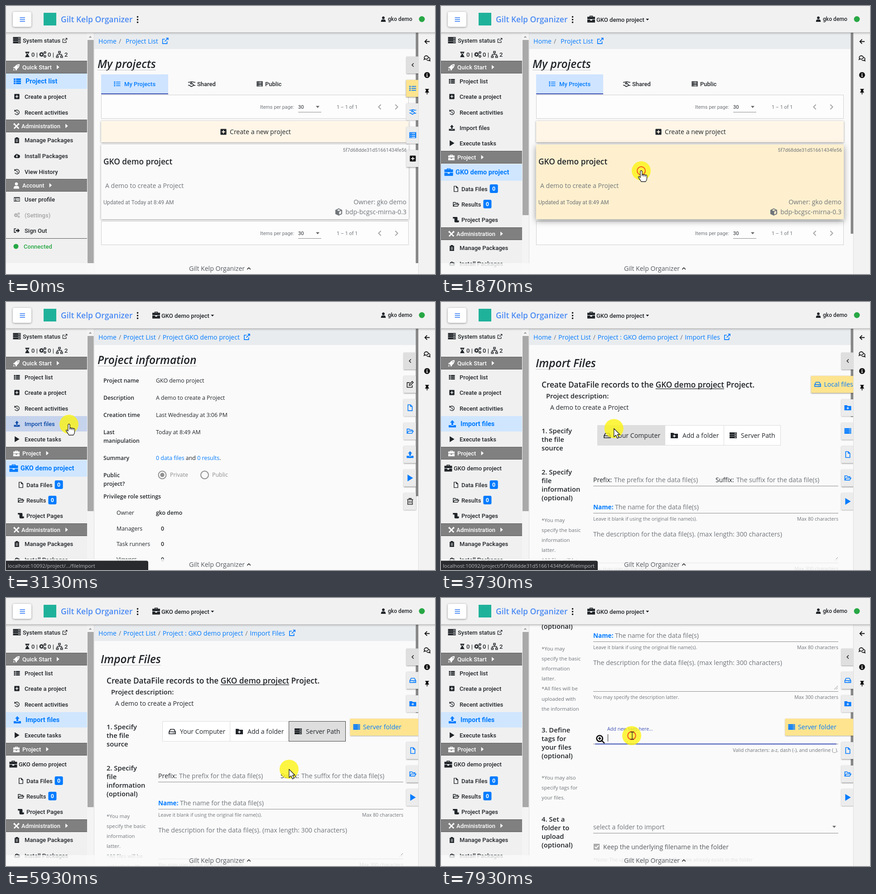
An HTML page with a canvas for the animation above (8000 ms loop, 947x592 px).

```html
<!DOCTYPE html>
<html lang="en">
<head>
<meta charset="utf-8">
<title>Project console</title>
<style>
html, body { margin: 0; width: 100%; height: 100%; overflow: hidden; background: #fafafa; }
canvas { display: block; width: 947px; height: 592px; }
</style>
</head>
<body>
<canvas id="stage"></canvas>
<script>
const W = 947, H = 592, LOOP = 8000;
const canvas = document.getElementById('stage');
const c = canvas.getContext('2d');
const dpr = window.devicePixelRatio || 1;
canvas.width = W * dpr;
canvas.height = H * dpr;

const APP = 'Gilt Kelp Organizer', PROJ = 'GKO demo project', USER = 'gko demo';
const ID = '5f7d68dde31d51661434fe56';
const BLUE = '#007bff', DARK = '#212529', GRAY = '#70757a', INDIGO = '#3f51b5';

const roboto = (n, w = 500) => `${w} ${n}px Roboto, sans-serif`;
const sans = (n, w = 400) => `${w} ${n}px "Open Sans", "Noto Sans", sans-serif`;
const BODY = sans(14.1), SMALL = sans(12.4), STRONG = sans(12.3, 600), STEP = sans(14.8, 600);
const HINT = sans(10.7), SIDE = roboto(13);

const clamp = v => Math.max(0, Math.min(1, v));
const smooth = u => u * u * (3 - 2 * u);
const ease = (t, a, b) => smooth(clamp((t - a) / (b - a)));

// Icons live in a 16 unit box.
const gear = (x, y, r) => {
  let d = '';
  for (let i = 0; i < 32; i++) {
    const a = (i + .5) / 32 * Math.PI * 2, k = i % 4 < 2 ? r : r * .74;
    d += (i ? 'L' : 'M') + (x + k * Math.cos(a)) + ' ' + (y + k * Math.sin(a));
  }
  const h = r * .36;
  return `${d}zM${x - h} ${y}a${h} ${h} 0 1 0 ${2 * h} 0a${h} ${h} 0 1 0 ${-2 * h} 0z`;
};
const rows = f => [2, 6.5, 11].map(f).join('');
const FILL = {
  server: rows(y => `M0 ${y - 1}h16v4H0zM11 ${y + .3}h1.5v1.4H11zM13.3 ${y + .3}h1.5v1.4h-1.5z`),
  hour: 'M2 0h12v2H2zM2 14h12v2H2zM3 2h10c0 4-3 4-3 6s3 2 3 6H3c0-4 3-4 3-6S3 6 3 2zM5 3.5h6L9 6H7z',
  cogs: gear(5.5, 8, 5.5) + gear(13, 3.8, 3.2) + gear(13, 12.2, 3.2),
  net: 'M5 0h6v5H5zM6.5 1.5v2h3v-2zM0 11h6v5H0zM1.5 12.5v2h3v-2zM10 11h6v5h-6zM11.5 12.5v2h3v-2zM7.3 5h1.4v2.3H14V11h-1.4V8.7H3.4V11H2V7.3h5.3z',
  rocket: 'M16 0C9 0 6 3 4 6L1 7l-1 3 4 .5L5.5 12 6 16l3-1 1-3c3-2 6-5 6-12zM12 2.8a1.3 1.3 0 1 1-.01 0zM1 12l3 3-4 1z',
  right: 'M4 1l8 7-8 7z',
  down: 'M1 4h14l-7 8z',
  list: rows(y => `M0 ${y}h4v3.4H0zM5.2 ${y}H16v3.4H5.2z`),
  bullets: rows(y => `M0 ${y}h3v3H0zM5 ${y + .6}h11v1.8H5z`),
  plus: 'M2.5 1h11Q15 1 15 2.5v11q0 1.5-1.5 1.5h-11Q1 15 1 13.5v-11Q1 1 2.5 1zM7 4v3H4v2h3v3h2V9h3V7H9V4z',
  upload: 'M8 0l5 5.5h-3V11H6V5.5H3zM0 11h5v1.2h6V11h5v5H0z',
  play: 'M2 0l13 8-13 8z',
  bag: 'M4.5 3V1h7v2H16v5H0V3zM6 2.3V3h4v-.7zM0 9h6v2h4V9h6v6H0z',
  scroll: 'M0 1h10q2 0 2 2v7h4v2q0 3-2.5 3H7q-3 0-3-3V5H0z',
  clip: 'M2 2h3V0h6v2h3v14H2zM5 5.5h6v1.2H5zM5 8.5h6v1.2H5zM5 11.5h6v1.2H5z',
  cloud: 'M4 14a4 4 0 0 1-1-7.8A5 5 0 0 1 12 5a4.5 4.5 0 0 1 0 9zM7 5v4H5l3 3.5L11 9H9V5z',
  user: 'M8 0a4 4 0 1 1-.01 0zM1 16c0-5 2-7 4-7h6c2 0 4 2 4 7z',
  card: 'M0 2h16v12H0zM1.3 4.5v8.2h13.4V4.5zM5 5.5a1.7 1.7 0 1 1-.01 0zM2.5 12c0-3 5-3 5 0zM9 6h4v1.2H9zM9 9h4v1.2H9z',
  out: 'M0 2h6v2H2v8h4v2H0zM10 2l6 6-6 6v-4H5V6h5z',
  table: 'M0 1h16v14H0z' + rows(y => `M2.5 ${y + .8}h2v2h-2zM6 ${y + .8}h7.5v2H6z`),
  folderPlus: 'M0 2h6l2 2h8v10H0zM7.2 6v2.2H5v1.6h2.2V12h1.6V9.8H11V8.2H8.8V6z',
  cube: 'M8 0l7.5 3.5v9L8 16 .5 12.5v-9zM8 2L4 4l4 1.8L12 4zM9 7.5v6l4.5-2.3V5.5z',
  info: 'M8 0a8 8 0 1 1-.01 0zM6.8 3v2.2h2.4V3zM6 6.5V8h1v3.5H6V13h4v-1.5H9v-5z',
  pin: 'M3 0h10v2h-2l.5 5q2 1 2 3H9v4l-1 2-1-2v-4H2.5q0-2 2-3L5 2H3z'
};
const LINE = {
  ext: 'M10 1.5h4.5V6M14.5 1.5L6.5 9.5M12 9v5.5H1.5V4H7',
  clock: 'M3 4A6.3 6.3 0 1 1 2.6 11M2 1v4h4M8.3 5v4l2.5 1.5',
  file: 'M3 1h6l4 4v10H3zM9 1v4h4',
  folder: 'M1 13V3h5l2 2h5v3M1 13l3-5h11.5l-3 5z',
  tools: 'M2 2l12 12M14 2L2 14M1 4l3-3M12 1l3 3',
  shake: 'M0 4.5h3l3-1h4l3 1h3M0 11h2.5l4.5 3 5-2.5h4M8.5 3.5L5 7.5q2 2 4-.5l4 4.5',
  up: 'M2 11l6-6 6 6', prev: 'M11 2L5 8l6 6', next: 'M5 2l6 6-6 6',
  edit: 'M13 10v5H1V4h6M6 10.5l.5-3L13 1l2.5 2.5L9 10z',
  trash: 'M1 3.5h14M5.5 3.5V1h5v2.5M2.5 3.5V15h11V3.5M6 6.5v6M10 6.5v6',
  disk: 'M1 8.5L4 3h8l3 5.5V13H1zM1 8.5h14M9.5 11h1M12 11h1',
  zoom: 'M11 11l4.5 4.5M6.5 1a5.5 5.5 0 1 1-.01 0zM6.5 4v5M4 6.5h5',
  back: 'M15 8H2M8 2L2 8l6 6',
  chat: 'M6 2a5 4 0 1 1-2.5 7.5L1 11l1-3A5 4 0 0 1 6 2zM12 6a4 3.5 0 0 1 2 5.5l1 2.5-3-1a5 4 0 0 1-5-1'
};
const HEAVY = { tools: 3, zoom: 2.2, back: 2.2, prev: 2.2, next: 2.2, up: 2.6 };
const HAND = 'M-2 1Q0-2 2 1V9q2-2 3.5 0q2-1.5 3.5.5q3-1 3.5 1.5V17q0 4-3 7H0Q-3 19-6 15q-1-3 2-2l2 2z';
const ARROW = 'M0 0V18.5L4.5 14.5l3 7 3.2-1.4-3-6.8H13z';
const BEAM = 'M-3-8h2.5q1.5 0 1.5 1.5V6.5Q1 8-.5 8H-3M5-8H2.5Q1-8 1-6.5M5 8H2.5Q1 8 1 6.5';
const cache = {};
const shape = d => cache[d] || (cache[d] = new Path2D(d));

function icon(name, x, y, size, color) {
  c.save();
  c.translate(x - size / 2, y - size / 2);
  c.scale(size / 16, size / 16);
  c.fillStyle = c.strokeStyle = color;
  if (FILL[name]) c.fill(shape(FILL[name]), 'evenodd');
  else {
    c.lineWidth = HEAVY[name] || 1.7;
    c.stroke(shape(LINE[name]));
  }
  c.restore();
}

// y is the middle of the capitals; returns the x after the text.
function text(s, x, y, font, color = DARK, align = 'left') {
  c.font = font;
  c.fillStyle = color;
  c.textAlign = align;
  c.fillText(s, x, y + parseFloat(font.match(/[\d.]+px/)[0]) * .357);
  return x + c.measureText(s).width;
}
const lines = (list, x, y, step, font, color) => list.forEach((s, i) => text(s, x, y + i * step, font, color));

function box(x, y, w, h, fill, border) {
  c.fillStyle = fill;
  c.fillRect(x, y, w, h);
  if (border) {
    c.strokeStyle = border;
    c.lineWidth = 1;
    c.strokeRect(x + .5, y + .5, w - 1, h - 1);
  }
}
function raised(x, y, w, h, fill, blur, dy = 1, r = 0) {
  c.save();
  c.shadowColor = 'rgba(0,0,0,.4)';
  c.shadowBlur = blur * dpr;
  c.shadowOffsetY = dy * dpr;
  c.fillStyle = fill;
  c.beginPath();
  c.roundRect(x, y, w, h, r);
  c.fill();
  c.restore();
}
function disc(x, y, r, fill, line) {
  c.beginPath();
  c.arc(x, y, r, 0, 7);
  if (fill) { c.fillStyle = fill; c.fill(); }
  if (line) { c.strokeStyle = line; c.lineWidth = 2; c.stroke(); }
}

function section(name, label, y) {
  box(0, y - 14, 179, 28, '#808080');
  box(0, y - 14, 179, 1, '#5a5a5a');
  box(0, y + 13, 179, 1, '#5a5a5a');
  icon(name, 23, y + .5, 14, '#fff');
  const end = text(label, name === 'tools' ? 34 : 36, y + .5, SIDE, '#fff');
  icon('right', end + 14, y, 11, '#fff');
}
function item(name, label, y, state, big) {
  if (state === 'on') {
    box(0, y - (big ? 18 : 17), 179, big ? 37 : 34, '#d0e6ff');
    icon(name, big ? 17 : 25, y, big ? 19 : 16, BLUE);
    text(label, big ? 32 : 43, y, roboto(14.5, 700), BLUE);
    return;
  }
  if (state === 'hover') box(0, y - 17, 179, 34, '#c6d3ec');
  const color = state === 'hover' ? '#0a4aa8' : state === 'off' ? '#a3a3a3' : DARK;
  icon(name, big ? 16 : 24, y, big ? 17 : 13, color);
  text(label, big ? 28 : 41, y, SIDE, color);
}
function sub(name, label, x, y, count) {
  icon(name, x, y, 13.5, DARK);
  const end = text(label, 45, y, SIDE);
  if (!count) return;
  c.fillStyle = BLUE;
  c.beginPath();
  c.roundRect(end + 5, y - 10, 18, 19, 3);
  c.fill();
  text('0', end + 14, y, roboto(12.5, 700), '#fff', 'center');
}

function sidebar(t) {
  const open = t >= 1730, onImport = t >= 3450;
  box(0, 59, 194, 533, '#f0f0f0');
  icon('server', 24, 76, 17, DARK);
  text('System status', 37, 76, SIDE);
  icon('ext', 130, 76, 11.5, DARK);
  icon('hour', 47, 107, 12, DARK);
  text('0 |', 56, 107, SIDE);
  icon('cogs', 81, 107, 16, DARK);
  text('0 |', 92, 107, SIDE);
  icon('net', 118, 107, 15, DARK);
  text('2', 129, 107, SIDE);
  section('rocket', 'Quick Start', 135);
  item('list', 'Project list', 166, open ? '' : 'on');
  item('plus', 'Create a project', 200);
  item('clock', 'Recent activities', 235);
  let y = 265;
  if (open) {
    item('upload', 'Import files', 269, onImport ? 'on' : t >= 2950 ? 'hover' : '');
    item('play', 'Execute tasks', 303);
    section('bag', 'Project', 334);
    item('bag', PROJ, 367, onImport ? '' : 'on', true);
    sub('file', 'Data Files', 33, 404, true);
    sub('folder', 'Results', 33, 438, true);
    sub('scroll', 'Project Pages', 33, 472);
    y = 503;
  }
  section('tools', 'Administration', y);
  item('clip', 'Manage Packages', y + 31.5);
  item('cloud', 'Install Packages', y + 66);
  if (!open) {
    item('clock', 'View History', 366);
    section('user', 'Account', 396);
    item('card', 'User profile', 427);
    item('cogs', '(Settings)', 462, 'off');
    item('out', 'Sign Out', 496);
    box(0, 513, 179, 1, '#555');
    disc(22, 531, 5.5, '#28a745');
    text('Connected', 39, 531, SIDE, '#28a745');
  }
  box(179, 59, 15, 533, '#f4f4f4');
  box(180, 75, 13.5, (open ? 462 : 568) - 75, '#a9a9a9');
  c.fillStyle = '#a3a3a3';
  c.fill(shape('M182.5 70h7l-3.5-4z'));
  box(194, 59, 1, 533, '#dcdcdc');
}

function header(t) {
  raised(-9, -9, W + 18, 67, '#f1f1f1', 5, 1);
  raised(15, 13, 41, 33, '#fff', 4, 1, 4);
  for (let i = 0; i < 3; i++) box(30.5, 25 + i * 4, 11.5, 1.7, '#4285f4');
  box(83, 15, 28, 28, '#1fb29a');
  text(APP, 121, 30, sans(17.5, 600), '#4a8af4');
  for (let i = 0; i < 3; i++) disc(290.5, 24 + i * 6, 1.8, '#111');
  if (t >= 1730) {
    icon('bag', 331.5, 29, 17, DARK);
    icon('down', text(PROJ, 343, 30, SIDE) + 7, 30, 8, DARK);
  }
  icon('user', 833, 29, 12, DARK);
  text(USER, 843, 29, roboto(12.1));
  disc(918, 29, 6.5, '#28a745');
}

function rail() {
  box(910, 59, 37, 533, '#f2f2f2');
  box(910, 59, 1, 533, '#dcdcdc');
  ['back', 'chat', 'info', 'pin'].forEach((n, i) => icon(n, 929.5, 78.5 + i * 37, i === 1 ? 15 : 13, '#111'));
}

function crumbs(parts, gap) {
  box(195, 59, 710, 36, '#e9ecef');
  let x = 204;
  parts.forEach((p, i) => {
    if (i) {
      text('/', x + 5, 78, BODY, GRAY);
      x += gap;
    }
    x = text(p, x, 78, BODY, BLUE);
  });
  icon('ext', x + 16, 77, 15, BLUE);
}
function heading(s, x, y) {
  const end = text(s, x, y, 'italic ' + sans(24.6, 600));
  box(x, y + 13, end - x, 1, '#c4c4c4');
}

// Each tab: icon, colour, label, openness 0..1
function tabs(list, right) {
  list.forEach(([name, color, label, k = 0], i) => {
    const x = right - 26.5 - k * 124, y = 111.5 + i * 51.7;
    raised(x, y, right - x + 1, 37.5, label && k > 0 ? '#ffe48f' : i ? '#ececec' : '#dfdfdf', 2.5);
    icon(name, x + 14.5, y + 18.7, i ? 15 : 10, color);
    if (k > 0 && label) {
      c.save();
      c.beginPath();
      c.rect(x, y, right - x, 38);
      c.clip();
      text(label, x + 28.5, y + 18.7, BODY, BLUE);
      c.restore();
    }
  });
}
const thumb = (y, h) => box(904.5, y, 5.5, h, '#868686');

function paginator(y) {
  box(210, y, 679, 53, '#fdfdfd', '#d0d0d0');
  text('Items per page:', 561, y + 27, roboto(10.9, 400), GRAY);
  text('30', 645, y + 27, roboto(11, 400));
  icon('down', 688, y + 27, 9, '#666');
  box(645, y + 38, 51, 1, '#8a8a8a');
  text('1 – 1 of 1', 730, y + 27, roboto(10.9, 400), GRAY);
  icon('prev', 825, y + 27, 14, '#a5a5a5');
  icon('next', 862, y + 27, 14, '#a5a5a5');
}

function projectList(t) {
  crumbs(['Home', 'Project List'], 20);
  heading('My projects', 202, 128);
  box(210, 151, 148, 44, '#cfe4ff');
  box(210, 193, 148, 2, INDIGO);
  icon('bullets', 245.5, 172, 14, BLUE);
  text('My Projects', 261, 172, SIDE, BLUE);
  icon('shake', 410, 172, 16, DARK);
  text('Shared', 422, 172, SIDE);
  icon('table', 560, 172, 13, DARK);
  text('Public', 572, 172, SIDE);
  paginator(196);
  paginator(475);
  raised(210, 254, 679, 47, '#fff6e8', 4);
  icon('plus', 480, 278, 15, DARK);
  text('Create a new project', 494, 278, BODY);
  const k = ease(t, 780, 960);
  raised(210, 306, 679, 165, `rgb(${250 + 4 * k},${250 - 10 * k},${250 - 44 * k})`, 4 + 9 * k, 1 + 3 * k);
  text(ID, 885, 318, roboto(10.9, 400), GRAY, 'right');
  text(PROJ, 215, 344, sans(17.3, 600));
  text('A demo to create a Project', 219, 397, BODY, GRAY);
  text('Updated at Today at 8:49 AM', 215, 434, roboto(12.1, 400), GRAY);
  text('Owner: ' + USER, 884, 433, BODY, GRAY, 'right');
  text('bdp-bcgsc-mirna-0.3', 884, 455, BODY, GRAY, 'right');
  icon('cube', 734.5, 455, 16, GRAY);
  thumb(59, t < 600 ? 509 : 444);
  if (t < 1730) tabs([['prev', '#111'], ['bullets', BLUE, ' ', .001], ['shake', BLUE], ['table', BLUE], ['plus', '#111']], 910);
}

function projectInfo(t) {
  crumbs(['Home', 'Project List', 'Project ' + PROJ], 15);
  heading('Project information', 202, 128);
  const label = (s, y) => text(s, 215, y, STRONG);
  label('Project name', 174);
  text(PROJ, 331, 174, SMALL);
  label('Description', 212);
  text('A demo to create a Project', 331, 212, SMALL);
  label('Creation time', 250);
  text('Last Wednesday at 3:06 PM', 331, 250, SMALL);
  label('Last', 288);
  label('manipulation', 307);
  text('Today at 8:49 AM', 331, 288, SMALL);
  label('Summary', 345);
  let x = text('0 data files', 331, 345, SMALL, BLUE);
  x = text(' and ', x, 345, SMALL);
  x = text('0 results', x, 345, SMALL, BLUE);
  text('.', x, 345, SMALL);
  label('Public', 383);
  label('project?', 402);
  disc(345, 382, 8.5, null, '#909090');
  disc(345, 382, 4.7, '#909090');
  text('Private', 362, 382, SMALL, '#8c8c8c');
  disc(438.5, 382, 8.5, null, '#909090');
  text('Public', 455, 382, SMALL, '#8c8c8c');
  label('Privilege role settings', 430);
  ['Owner', 'Managers', 'Task runners', 'Viewers'].forEach((s, i) => {
    const y = 466 + i * 34.2;
    text(s, 244, y, SMALL);
    text(i ? '0' : USER, i ? 342 : 331, y, STRONG);
  });
  thumb(59, 370);
  const slide = 40 * (1 - ease(t, 2300, 2550));
  tabs([['prev', '#111'], ['edit', '#222'], ['file', BLUE], ['folder', BLUE], ['upload', BLUE], ['play', BLUE], ['trash', '#333']], 904 + slide);
}

function choice(name, label, x, w, fill, iconX, textX, border = '#dcdcdc') {
  box(x, 272, w, 45, fill, border);
  icon(name, iconX, 295, 16, DARK);
  text(label, textX, 295, BODY);
}
function importFiles(t) {
  const scroll = 370 * ease(t, 6350, 7082);
  const server = t >= 4860;
  const rule = y => box(336, y, 541, 1, '#8c8c8c');
  const step = (list, y) => lines(list, 222, y, 19, STEP);
  const note = (list, y) => lines(list, 222, y, 22.1, sans(11.3), GRAY);
  c.save();
  c.translate(0, -scroll);
  crumbs(['Home', 'Project List', 'Project : ' + PROJ, 'Import Files'], 15);
  heading('Import Files', 209, 135);
  const big = sans(17.2, 600);
  const x = text('Create DataFile records to the ', 222, 183, big);
  const end = text(PROJ, x, 183, big);
  box(x, 191, end - x, 1.3, DARK);
  text(' Project.', end, 183, big);
  text('Project description:', 232, 208, STEP);
  text('A demo to create a Project', 241, 233, BODY);

  step(['1. Specify', 'the file', 'source'], 284.5);
  choice('disk', 'Your Computer', 345, 150, server ? '#fff' : '#dedede', 367, 384);
  choice('folderPlus', 'Add a folder', 494, 131, '#fff', 515, 533);
  choice('server', 'Server Path', 624, 126, server ? '#dedede' : t > 4050 ? '#f3f3f3' : '#fff', 645, 662, server ? '#444' : '#dcdcdc');

  step(['2. Specify', 'file', 'information', '(optional)'], 376);
  note(['*You may', 'specify the basic', 'information', 'latter.', '*All files will be', 'uploaded with', 'the information'], 482);
  text('Prefix:', 336, 393, BODY);
  text('The prefix for the data file(s)', 382, 393, BODY, GRAY);
  text('Suffix:', 606, 393, BODY);
  text('The suffix for the data file(s)', 652, 393, BODY, GRAY);
  rule(406);
  text('Name:', 336, 453, sans(13.6, 700), BLUE);
  text('The name for the data file(s)', 384, 453, BODY, GRAY);
  rule(466);
  text('Leave it blank if using the original file name(s).', 336, 479.5, HINT, GRAY);
  text('Max 80 characters', 877, 479.5, HINT, GRAY, 'right');
  text('The description for the data file(s). (max length: 300 characters)', 336, 513, sans(14.2), GRAY);
  c.strokeStyle = '#888';
  c.lineWidth = 1;
  c.stroke(shape('M868 572l8-8M872 572l4-4'));
  rule(576);
  text('You may specify the description latter.', 336, 589.5, HINT, GRAY);
  text('Max 300 characters', 877, 589.5, HINT, GRAY, 'right');

  step(['3. Define', 'tags for', 'your files', '(optional)'], 661.5);
  note(['*You may also', 'specify tags for', 'your files.'], 767);
  icon('zoom', 352, 682, 19, '#111');
  const f = ease(t, 7690, 7900);
  text('Add new tags here...', 367, 678.5 - 19.5 * f, sans(14.1 - 3.4 * f), f > 0 ? INDIGO : GRAY);
  rule(692);
  if (f > 0) {
    const half = 270.5 * ease(t, 7690, 7950);
    box(606.5 - half, 691.5, 2 * half, 2, INDIGO);
    box(368, 671, 1, 16, '#222');
  }
  text('Valid characters: a-z, dash (-), and underline (_).', 877, 706, HINT, GRAY, 'right');

  step(['4. Set a', 'folder to', 'upload', '(optional)'], 858.5);
  note(['*Folders will be', 'created if needed'], 966);
  text('select a folder to import', 336, 875.5, BODY, GRAY);
  icon('down', 868, 875.5, 9, '#666');
  rule(889);
  box(337, 913, 13, 13, '#b0b0b0', '#9a9a9a');
  c.strokeStyle = '#fff';
  c.lineWidth = 2;
  c.stroke(shape('M339.5 919.5l3 3 5.5-6'));
  text('Keep the underlying filename in the folder', 358, 919.5, BODY, '#55595e');
  text('*Note: The uploading will fail if the filename already exists in the folder', 336, 948, HINT, GRAY);
  c.restore();

  thumb(59 + scroll * .366, 195);
  const local = ease(t, 3600, 3850) * (1 - ease(t, 4880, 5080));
  tabs([['prev', '#111'], ['disk', BLUE, 'Local files', local], ['folderPlus', BLUE],
    ['server', BLUE, 'Server folder', ease(t, 4950, 5200)], ['file', BLUE], ['folder', BLUE], ['play', BLUE]], 910);
}

function footer(t) {
  box(0, 568, 910, 24, 'rgba(250,250,250,.82)');
  icon('up', text(APP, 404, 580, BODY, '#555a60') + 9, 580, 10, '#333');
  if (t < 2950 || t >= 4830) return;
  const long = t >= 3400;
  c.fillStyle = '#292a2d';
  c.beginPath();
  c.roundRect(0, 571.5, long ? 346 : 314, 21, [0, 4, 0, 0]);
  c.fill();
  text(`localhost:10092/project/${long ? ID : '...'}/fileImport`, 4, 583, sans(11.3), '#b9bcc0');
}

// time, x, y, eased
const PATH = [
  [530, 520, 616], [1000, 442, 364, 1], [2470, 442, 364], [3070, 139, 270, 1], [3400, 139, 270],
  [4130, 703, 292, 1], [4330, 700, 295], [5400, 700, 294], [5930, 625, 378], [6200, 579, 436],
  [6600, 536, 460, 1], [7000, 534, 460], [7070, 530, 443], [7130, 530, 443], [7600, 421, 304, 1], [LOOP, 421, 304]
];
const CLICKS = [1600, 3330, 4780, 7690];
const within = (t, a, b) => t >= a && t < b;

function pointer(t) {
  if (t < 530) return;
  const i = PATH.findIndex(p => p[0] > t);
  const [t0, x0, y0] = PATH[i - 1], [t1, x1, y1, eased] = PATH[i];
  let u = (t - t0) / (t1 - t0);
  if (eased) u = smooth(u);
  const x = x0 + (x1 - x0) * u, y = y0 + (y1 - y0) * u;
  disc(x, y, 21, 'rgba(253,244,20,.8)');
  const hit = CLICKS.find(k => within(t, k, k + 330));
  if (hit) disc(x, y, 3 + 6 * clamp((t - hit) / 250), null, '#f4511e');
  c.save();
  c.translate(x, y);
  c.lineJoin = 'round';
  c.strokeStyle = '#222';
  c.fillStyle = '#fff';
  c.lineWidth = 1.3;
  if (t >= 7550) c.stroke(shape(BEAM));
  else {
    const hand = within(t, 850, 2000) || within(t, 2900, 3600) || within(t, 4050, 5550);
    const p = shape(hand ? HAND : ARROW);
    c.fill(p);
    c.stroke(p);
    if (hand) c.stroke(shape('M2 8v4M5.5 9v3.5M9 10v3'));
  }
  c.restore();
}

function draw(t) {
  c.setTransform(dpr, 0, 0, dpr, 0, 0);
  box(0, 0, W, H, '#fafafa');
  c.save();
  c.beginPath();
  c.rect(195, 59, 715, 533);
  c.clip();
  (t < 2000 ? projectList : t < 3530 ? projectInfo : importFiles)(t);
  c.restore();
  sidebar(t);
  rail();
  footer(t);
  header(t);
  pointer(t);
}

const start = performance.now();
function tick() {
  draw((performance.now() - start) % LOOP);
  requestAnimationFrame(tick);
}
tick();
</script>
</body>
</html>
```
